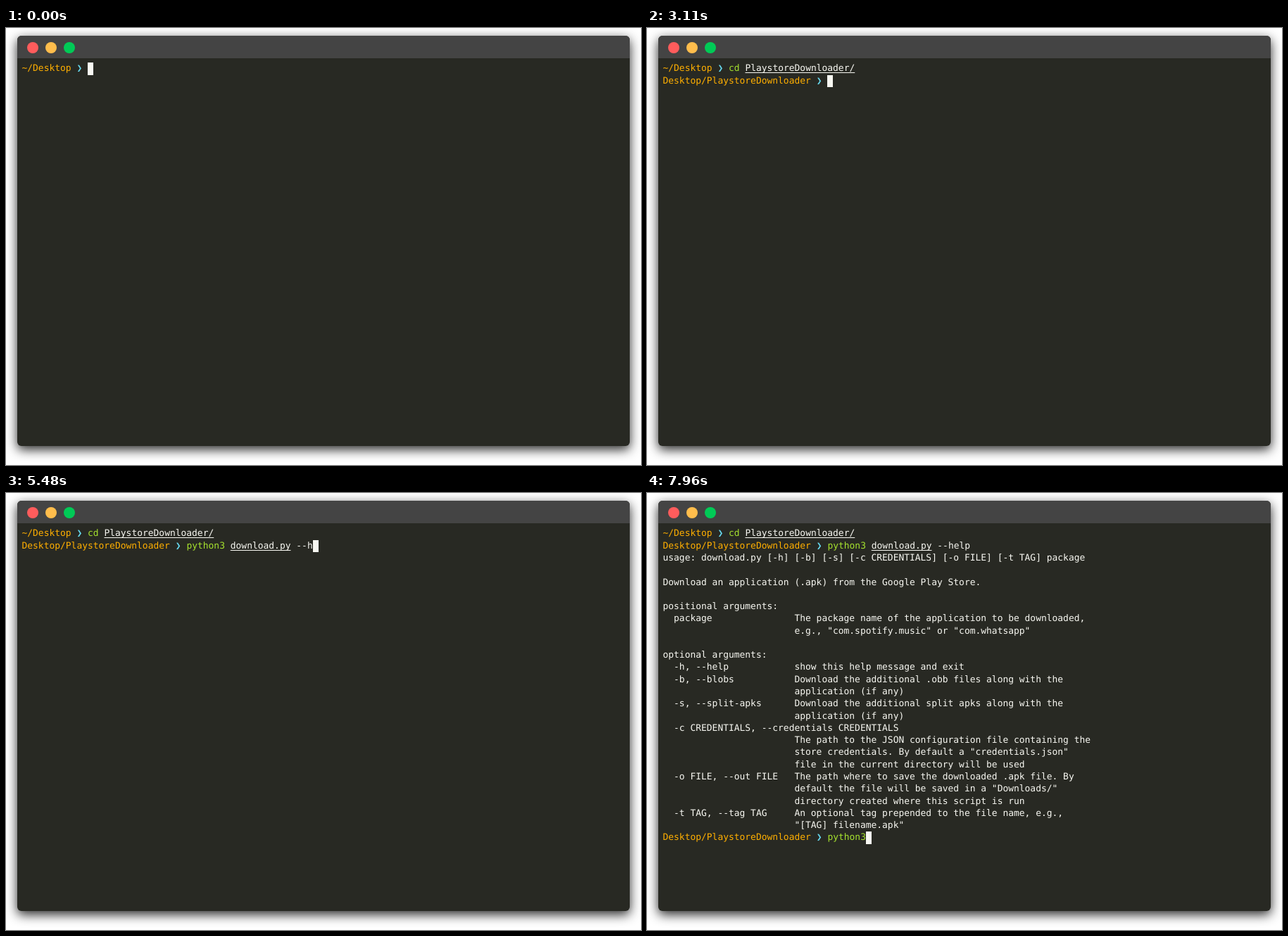
Write an HTML page that moves like this. It is 902 px wide and 621 px high and loops after 8000 ms.

```html
<!DOCTYPE html>
<html lang="en">
<head>
<meta charset="utf-8">
<title>Terminal</title>
<style>
  html, body { margin: 0; width: 100%; height: 100%; overflow: hidden; background: #fff; }
  #window {
    position: absolute; left: 16px; top: 11px; width: 870px; height: 583px;
    border-radius: 6px; background: #282923;
    box-shadow: 0 5px 16px rgba(0, 0, 0, .85);
  }
  #bar { height: 32px; border-radius: 6px 6px 0 0; background: #444; }
  #bar i {
    position: absolute; top: 8.5px; width: 16px; height: 16px; border-radius: 50%;
  }
  #screen {
    position: absolute; left: 0; top: 0; color: #f8f8f2;
    font: 12.95px/17.28px "DejaVu Sans Mono", monospace;
    text-rendering: geometricPrecision;
    font-variant-ligatures: none;
  }
  #screen span { position: absolute; white-space: pre; }
  #screen .dir { color: #ffaf00; }
  #screen .arrow { color: #66d9ef; }
  #screen .cmd { color: #a6e22e; }
  #screen .path {
    text-decoration: underline 1px; text-underline-offset: 2px;
    text-decoration-skip-ink: none;
  }
  #cursor { position: absolute; width: 8px; height: 17.4px; background: #f8f8f2; }
</style>
</head>
<body>
<div id="window">
  <div id="bar">
    <i style="left:14px;background:#ff5c5c"></i>
    <i style="left:40px;background:#ffbd4c"></i>
    <i style="left:66px;background:#00ca56"></i>
  </div>
</div>
<div id="screen"><div id="cursor"></div></div>
<script>
const LOOP = 8000, LEFT = 22.5, TOP = 49.4, CELL = 7.797, ROW = 17.28;
const screen = document.getElementById('screen');
const cursor = document.getElementById('cursor');

const HELP = `usage: download.py [-h] [-b] [-s] [-c CREDENTIALS] [-o FILE] [-t TAG] package

Download an application (.apk) from the Google Play Store.

positional arguments:
  package               The package name of the application to be downloaded,
                        e.g., "com.spotify.music" or "com.whatsapp"

optional arguments:
  -h, --help            show this help message and exit
  -b, --blobs           Download the additional .obb files along with the
                        application (if any)
  -s, --split-apks      Download the additional split apks along with the
                        application (if any)
  -c CREDENTIALS, --credentials CREDENTIALS
                        The path to the JSON configuration file containing the
                        store credentials. By default a "credentials.json"
                        file in the current directory will be used
  -o FILE, --out FILE   The path where to save the downloaded .apk file. By
                        default the file will be saved in a "Downloads/"
                        directory created where this script is run
  -t TAG, --tag TAG     An optional tag prepended to the file name, e.g.,
                        "[TAG] filename.apk"`;
const HELP_AT = 6600;

// keys: the time at which each character of the command appears
const lines = [
  { row: 0, at: 0, enter: 3110, dir: '~/Desktop',
    parts: [['cmd', 'cd'], ['', ' '], ['path', 'PlaystoreDownloader/']],
    keys: [860, 990, 990, 1120, 1120, 1180, 1240, 1370, 1500, 1500, 1630, 1690,
           1820, 1880, 2010, 2010, 2140, 2200, 2330, 2330, 2390, 2450, 2510] },
  { row: 1, at: 3110, enter: 6400, dir: 'Desktop/PlaystoreDownloader',
    parts: [['cmd', 'python3'], ['', ' '], ['path', 'download.py'], ['', ' --help']],
    keys: [3240, 3370, 3500, 3500, 3630, 3690, 3750, 3810,
           4010, 4140, 4200, 4330, 4390, 4520, 4580, 4710,
           4840, 4970, 5030, 5160, 5290, 5350, 5480, 5610, 5670, 5800] },
  { row: 25, at: HELP_AT, enter: LOOP, dir: 'Desktop/PlaystoreDownloader',
    parts: [['cmd', 'python3']],
    keys: [7390, 7520, 7580, 7710, 7770, 7900, 7960] }
];

function place(el, row, col) {
  el.style.left = LEFT + col * CELL + 'px';
  el.style.top = TOP + row * ROW + 'px';
}

function addText(row, col, text, cls) {
  const el = document.createElement('span');
  el.className = cls;
  el.textContent = text;
  place(el, row, col);
  screen.append(el);
  return el;
}

const show = (el, on) => { el.style.visibility = on ? 'visible' : 'hidden'; };

const help = HELP.split('\n').map((text, i) => addText(i + 2, 0, text, ''));

for (const line of lines) {
  const { row, dir } = line;
  line.prompt = [addText(row, 0, dir, 'dir'), addText(row, dir.length + 1, '❯', 'arrow')];
  line.start = dir.length + 3;
  let offset = 0;
  line.typed = line.parts.map(([cls, text]) => {
    const part = { text, offset, el: addText(row, line.start + offset, '', cls) };
    offset += text.length;
    return part;
  });
}

function render(t) {
  for (const line of lines) {
    const count = line.keys.filter(k => k <= t).length;
    line.prompt.forEach(el => show(el, t >= line.at));
    for (const { el, text, offset } of line.typed)
      el.textContent = text.slice(0, Math.max(0, count - offset));
    if (t >= line.at && t < line.enter) place(cursor, line.row, line.start + count);
  }
  help.forEach(el => show(el, t >= HELP_AT));
  if (t >= lines[1].enter && t < HELP_AT) place(cursor, 2, 0);
}

const began = performance.now();
function tick() {
  render((performance.now() - began) % LOOP);
  requestAnimationFrame(tick);
}
tick();
</script>
</body>
</html>
```
